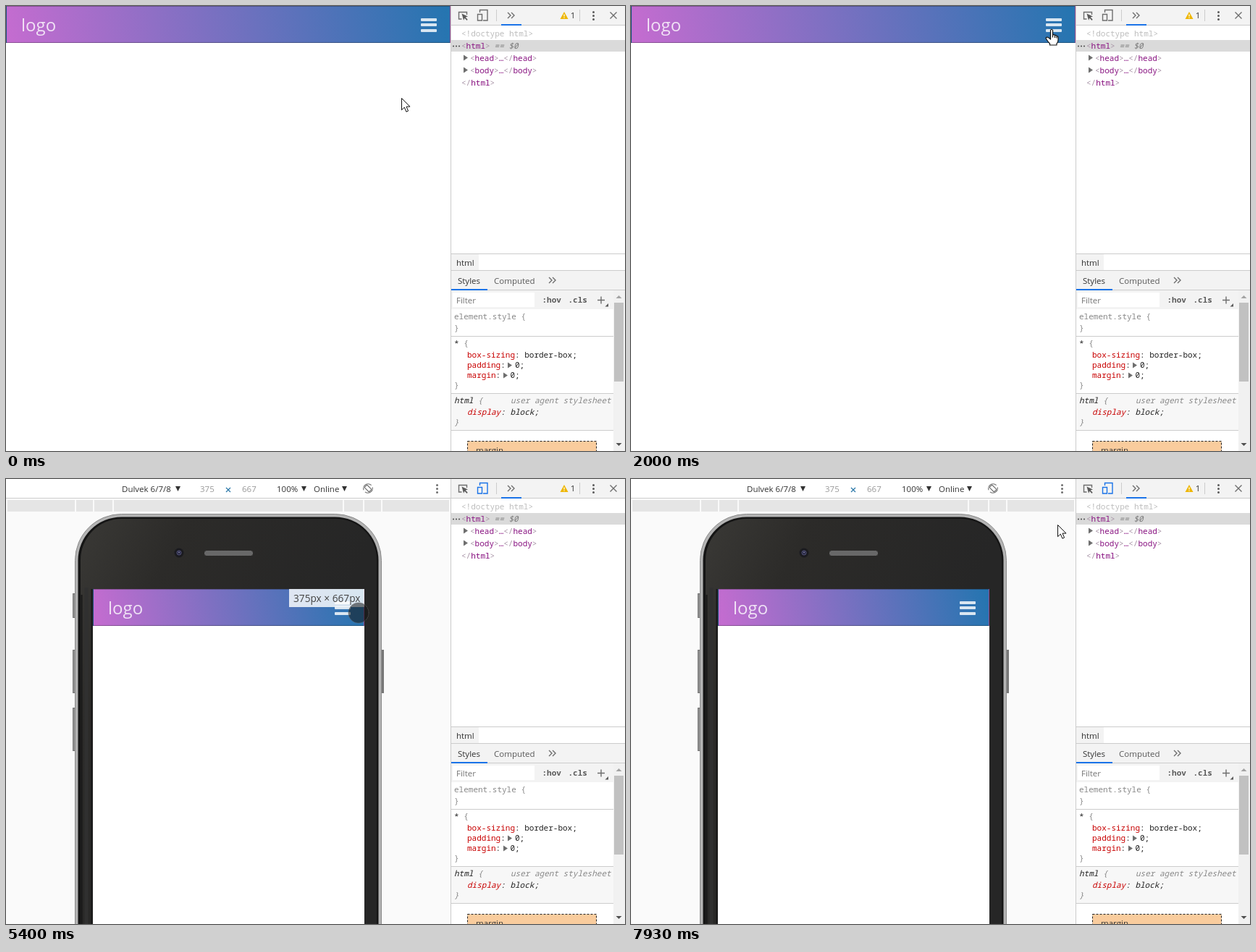
Animation, 855 px wide and 615 px high, one loop 8 s. Source, as an HTML page:

```html
<!DOCTYPE html>
<html lang="en">
<head>
<meta charset="utf-8">
<title>Responsive menu demo</title>
<style>
  html, body { margin: 0; width: 100%; height: 100%; overflow: hidden; background: #fff; }
  #stage { position: relative; width: 855px; height: 615px; overflow: hidden; }
  svg { position: absolute; left: 0; top: 0; }
  svg text { white-space: pre; }
  .ui { font: 11.5px "Open Sans", sans-serif; fill: #333; }
  .code { font: 11px "Noto Sans Mono", monospace; fill: #222; }
  .dim { fill: #888; }
  .it { font-style: italic; }
  .tag { fill: #881280; }
  .tag tspan { fill: #a894a6; }
  .prop { fill: #c80000; }
  .line { stroke: #ccc; fill: none; }
  .icon { fill: none; stroke: #6e6e6e; stroke-width: 1.4; }
  #nav {
    position: absolute; box-sizing: border-box; overflow: hidden;
    border: 1px solid rgba(0, 0, 0, .28);
    background: linear-gradient(80deg, #c56cd0, #2475b0);
    color: rgba(255, 255, 255, .8); font-family: "Open Sans", sans-serif;
  }
  #nav b { position: absolute; left: 20px; top: 7px; font-size: 24px; font-weight: 400; line-height: 36px; }
  #nav i { position: absolute; right: 18.5px; width: 22px; height: 4px; border-radius: 1px; background: rgba(255, 255, 255, .82); }
  #nav p { margin: 0; height: 39px; font-size: 18.4px; line-height: 39px; text-align: center; }
  #items { position: absolute; top: 46px; width: 100%; }
  #tint { position: absolute; inset: -1px; background: rgba(111, 168, 220, .66); }
</style>
</head>
<body>
<div id="stage">
  <svg id="device" width="855" height="615">
    <defs>
      <linearGradient id="glass" x1="0" y1="0" x2=".6" y2=".5">
        <stop offset="0" stop-color="#3a3936"/><stop offset=".35" stop-color="#2c2b29"/><stop offset="1" stop-color="#262626"/>
      </linearGradient>
      <pattern id="mesh" width="2" height="2" patternUnits="userSpaceOnUse">
        <path d="M0 0h2v2h-2z" fill="#4b4b4b"/><path d="M0 0h1v1h-1zM1 1h1v1h-1z" fill="#858585"/>
      </pattern>
    </defs>
    <path d="M0 0h614v615H0z" fill="#fafafa"/>
    <path d="M0 0h614v26H0z" fill="#fff"/>
    <path class="line" d="M0 26.5h614"/>
    <path d="M2 29h610v16H2z" fill="#e5e5e5"/>
    <path d="M96 29v16M121 29v16M148 29v16M466 29v16M494 29v16M519 29v16" stroke="#fafafa" stroke-width="2"/>
    <g class="ui">
      <text x="160" y="18">Dulvek 6/7/8</text>
      <text x="268" y="18" fill="#999">375</text>
      <text x="326" y="18" fill="#999">667</text>
      <text x="374" y="18">100%</text>
      <text x="425" y="18">Online</text>
    </g>
    <path d="M234 10h7l-3.500 7zM408 10h7l-3.500 7zM464 10h7l-3.500 7z" fill="#333"/>
    <path d="M304 12l6 6M310 12l-6 6" stroke="#2a77a8" stroke-width="1.2"/>
    <g class="icon" stroke-width="1">
      <circle cx="500" cy="13" r="6.3" stroke-dasharray="14 3 17 3" stroke-width="1.1"/>
      <rect x="497.500" y="8.500" width="5" height="9" rx="1" transform="rotate(-45 500 13)" stroke-width="1.1"/>
    </g>
    <g fill="#6e6e6e"><circle cx="595.500" cy="8.500" r="1.5"/><circle cx="595.500" cy="13.500" r="1.5"/><circle cx="595.500" cy="18.500" r="1.5"/></g>
    <g id="phone">
      <path d="M92 158h5v34h-5zM92 236h5v60h-5zM92 316h5v60h-5zM517 236h5v60h-5z" fill="#777"/>
      <path d="M94 159v32M94 237v58M94 317v58" stroke="#aaa"/>
      <rect x="95.500" y="48.500" width="423" height="700" rx="64" fill="#b4b4b4" stroke="#8b8b8b"/>
      <rect x="99.500" y="52.500" width="415" height="700" rx="60" fill="#151515"/>
      <rect x="103" y="55" width="409" height="700" rx="57" fill="url(#glass)"/>
      <path d="M104.500 160V615M118.500 152V615" stroke="#181818" stroke-width="2"/>
      <path d="M111 150V615" stroke="#303030" stroke-width="5"/>
      <circle cx="239" cy="102" r="6.500" fill="#1b1b20"/>
      <circle cx="239" cy="102" r="3" fill="#24243c" stroke="#54547c"/>
      <circle cx="239" cy="101.500" r="1" fill="#8888ad"/>
      <rect x="274" y="99" width="67" height="7" rx="3.500" fill="url(#mesh)"/>
      <path d="M120 152h375v463H120z" fill="#fff"/>
    </g>
  </svg>

  <div id="nav">
    <b>logo</b>
    <i style="top:16px"></i><i style="top:23px"></i><i style="top:31px"></i>
    <div id="items"><p>Home</p><p>Products</p><p>About Us</p><p>Concat Us</p><p>Blog</p></div>
    <div id="tint"></div>
  </div>

  <svg width="855" height="615">
    <g id="size">
      <path d="M391 152h104v25H391z" fill="#fff" fill-opacity=".82"/>
      <text class="ui" x="397" y="170" style="font-size:13.7px;fill:#444">375px × 667px</text>
    </g>

    <path d="M614 0h241v615H614z" fill="#fff"/>
    <path d="M615 0h240v26H615zM615 343h38v22h-38zM615 366h240v53H615z" fill="#f3f3f3"/>
    <path class="line" d="M614.500 0V615M615 26.500h240M615 342.500h240M615 365.500h240M615 392.500h240M677.500 5v16M792.500 5v16"/>
    <path d="M684 25h28v2h-28zM615 391h50v2h-50z" fill="#1a73e8"/>

    <path class="icon" d="M636.500 12V8.500h-11v9.500h4"/>
    <path d="M629.500 10.500l8.500 4-3.300 1 3 3.300-1.200 1.100-3-3.200-1.400 3z" fill="#5a5a5a"/>
    <g id="toggle" fill="none" stroke-width="1.4">
      <path d="M654.500 9V5.500h10.500V20h-6"/><path d="M651.500 11.500h6V20h-6z"/>
    </g>
    <path class="icon" d="M693 9l4 4-4 4M698 9l4 4-4 4M750 375l4 4-4 4M755 375l4 4-4 4"/>
    <path d="M771 8l5.500 10h-11z" fill="#eeb600"/><path d="M771 11.500v3M771 15.500v1.300" stroke="#fff" stroke-width="1.300"/>
    <g fill="#5a5a5a"><circle cx="811.500" cy="8.500" r="1.5"/><circle cx="811.500" cy="13.500" r="1.5"/><circle cx="811.500" cy="18.500" r="1.5"/></g>
    <path class="icon" d="M834.500 8.500l9 9M843.500 8.500l-9 9"/>

    <path d="M615 47h240v16H615z" fill="#dadada"/>
    <rect id="hover" x="618" y="47" width="234" height="16" rx="5" fill="#3879d9" fill-opacity=".12"/>
    <g fill="#555"><circle cx="618" cy="55.500" r="1.1"/><circle cx="622" cy="55.500" r="1.1"/><circle cx="626" cy="55.500" r="1.1"/></g>
    <path d="M632 67.500l6 4-6 4zM632 84.500l6 4-6 4zM693 492.500l6 4-6 4zM687 506.500l6 4-6 4z" fill="#6e6e6e"/>
    <g class="code">
      <text x="629" y="42" fill="#bdbdbd" style="fill:#bdbdbd">&lt;!doctype html&gt;</text>
      <text class="tag" x="629" y="59"><tspan>&lt;</tspan>html<tspan>&gt;</tspan></text>
      <text class="dim it" x="668" y="59" style="fill:#777"> == $0</text>
      <text class="tag" x="641" y="76"><tspan>&lt;</tspan>head<tspan>&gt;</tspan>…<tspan>&lt;/</tspan>head<tspan>&gt;</tspan></text>
      <text class="tag" x="641" y="93"><tspan>&lt;</tspan>body<tspan>&gt;</tspan>…<tspan>&lt;/</tspan>body<tspan>&gt;</tspan></text>
      <text class="tag" x="629" y="110"><tspan>&lt;/</tspan>html<tspan>&gt;</tspan></text>
    </g>
    <g class="ui">
      <text x="783" y="17" text-anchor="middle">1</text>
      <text x="622" y="359">html</text>
      <text x="624" y="384">Styles</text>
      <text x="674" y="384" style="fill:#5a5a5a">Computed</text>
    </g>

    <path d="M617 396h113v20H617z" fill="#fff"/>
    <text class="ui" x="622" y="411" style="fill:#757575">Filter</text>
    <g class="code" font-weight="600" style="fill:#5a5a5a"><text x="740.500" y="410" font-weight="600">:hov</text><text x="776.500" y="410" font-weight="600">.cls</text></g>
    <path class="icon" d="M817 406.500h10M822 401.500v10"/>
    <path d="M832 411v4.500h-4.500z" fill="#5a5a5a"/>

    <path d="M615 536h224v50H615z" fill="#f7f7f7"/>
    <path class="line" d="M615 456.500h224M615 535.500h224M615 586.500h224"/>
    <g class="code">
      <text class="dim" x="619" y="433">element.style {</text>
      <text class="dim" x="619" y="449">}</text>
      <text x="619" y="470">* <tspan class="dim">{</tspan></text>
      <text x="637" y="486"><tspan class="prop">box-sizing</tspan>: border-box;</text>
      <text x="637" y="500"><tspan class="prop">padding</tspan>:</text><text x="703" y="500">0;</text>
      <text x="637" y="514"><tspan class="prop">margin</tspan>:</text><text x="696.500" y="514">0;</text>
      <text class="dim" x="619" y="528">}</text>
      <g class="it">
        <text x="619" y="549">html <tspan class="dim">{</tspan></text>
        <text class="dim" x="697" y="549">user agent stylesheet</text>
        <text x="637" y="565"><tspan class="prop">display</tspan>: block;</text>
        <text class="dim" x="619" y="579">}</text>
      </g>
    </g>
    <rect x="637.500" y="601.500" width="178" height="40" fill="#f9cc9d" stroke="#222" stroke-dasharray="3 2"/>
    <text class="ui" x="649" y="618">margin</text><text class="ui" x="723" y="618">–</text>

    <path d="M839 393h16v222h-16z" fill="#f1f1f1"/>
    <path d="M840 410h13v109h-13z" fill="#c1c1c1"/>
    <path d="M842.500 404h8l-4-4z" fill="#a3a3a3"/><path d="M842.500 604h8l-4 4z" fill="#505050"/>

    <g id="tip">
      <rect x="638.500" y="28.500" width="214" height="25" rx="2" fill="#f3f3f3" stroke="#c4c4c4" style="filter:drop-shadow(0 1px 2px rgba(0,0,0,.3))"/>
      <text class="ui" x="646" y="46">Toggle device toolbar</text>
      <text class="ui dim" x="844" y="46" text-anchor="end" style="fill:#808080;font-size:11px">Ctrl + Shift + M</text>
    </g>

    <g id="arrow" fill="#fff" stroke="#111" stroke-linejoin="round">
      <path d="M.5.5v16.200l3.800-3.600 2.600 6.100 2.700-1.200-2.600-5.900h5z"/>
    </g>
    <g id="hand" fill="#fff" stroke="#111" stroke-width="1.2" stroke-linejoin="round">
      <path d="M-1.500 14V1.500Q0-1 1.500 1.500V8q2.500-1 3 .800 2-1 2.500.900 2-.500 2 1.700V15q0 3-2 5v2H-2.500v-2Q-5 17.500-7.500 13.500-8.500 11-6 11-4 11.500-1.500 14z"/>
      <path d="M1.500 8v3.500M4.500 9v3M7 10v2.500" fill="none"/>
    </g>
    <g id="touch"><circle r="14" fill="#141414" fill-opacity=".55"/><circle r="14" fill="none" stroke="#666" stroke-dasharray="1 1"/></g>
    <path id="resize" d="M-11 0l5-4.500V-1.500H6v-3L11 0 6 4.500v-3H-6v3z" fill="#fff" stroke="#111"/>
  </svg>
</div>

<script>
const $ = id => document.getElementById(id);
const LOOP = 8000, FPS = 15;

// step, x, y, pointer shape from here on
const path = [
  [0, 546, 127, 'arrow'], [1, 500, 124], [4, 159, 112], [11, 622, 36], [12, 622, 36],
  [13, 640, 64], [15, 612, 60], [17, 581, 32, 'hand'], [33, 581, 32],
  [36, 605, 27, 'arrow'], [39, 605, 27], [42, 609, 29], [44, 609, 29], [45, 612, 28],
  [47, 609, 30], [48, 609, 30], [49, 614, 25], [54, 614, 25], [55, 607, 23], [58, 607, 23],
  [62, 650, 8], [66, 664, 13], [75, 664, 13], [79, 570, 90],
  [81, 487, 185, 'touch'], [84, 450, 270], [88, 457, 311], [89, 450, 318], [91, 450, 318],
  [98, 475, 182], [113, 475, 182], [115, 500, 150, 'arrow'], [119, 619, 34, 'resize']
];
const shapes = ['arrow', 'hand', 'touch', 'resize'];

const show = (id, on) => { $(id).style.display = on ? '' : 'none'; };
const within = (n, from, to) => n >= from && n < to;

function pointer(n) {
  let i = 0, shape;
  path.forEach((p, k) => { if (p[0] <= n) { i = k; shape = p[3] || shape; } });
  const a = path[i], b = path[i + 1] || a;
  const f = b === a ? 0 : (n - a[0]) / (b[0] - a[0]);
  const [x, y] = [1, 2].map(k => Math.round(a[k] + (b[k] - a[k]) * f));
  shapes.forEach(s => show(s, s === shape));
  $(shape).setAttribute('transform', `translate(${x} ${y})`);
}

function draw(ms) {
  const n = Math.floor((ms % LOOP + 1) * FPS / 1000) % (LOOP * FPS / 1000);
  const mobile = n >= 71, phone = n >= 72;
  const open = within(n, 22, 30) || within(n, 104, 114);
  const nav = $('nav').style;
  nav.left = mobile ? '120px' : '0';
  nav.top = mobile ? '152px' : '0';
  nav.width = mobile ? '375px' : '614px';
  nav.height = open ? '261px' : '51px';
  show('nav', !mobile || phone);
  show('items', open);
  show('device', mobile);
  show('phone', phone);
  show('size', within(n, 72, 86));
  show('tip', within(n, 66, 71));
  show('tint', within(n, 13, 15));
  show('hover', within(n, 13, 15));
  $('toggle').setAttribute('stroke', mobile ? '#1a73e8' : n >= 63 ? '#222' : '#6e6e6e');
  pointer(n);
}

const start = performance.now();
function tick() {
  draw(performance.now() - start);
  requestAnimationFrame(tick);
}
tick();
</script>
</body>
</html>
```
